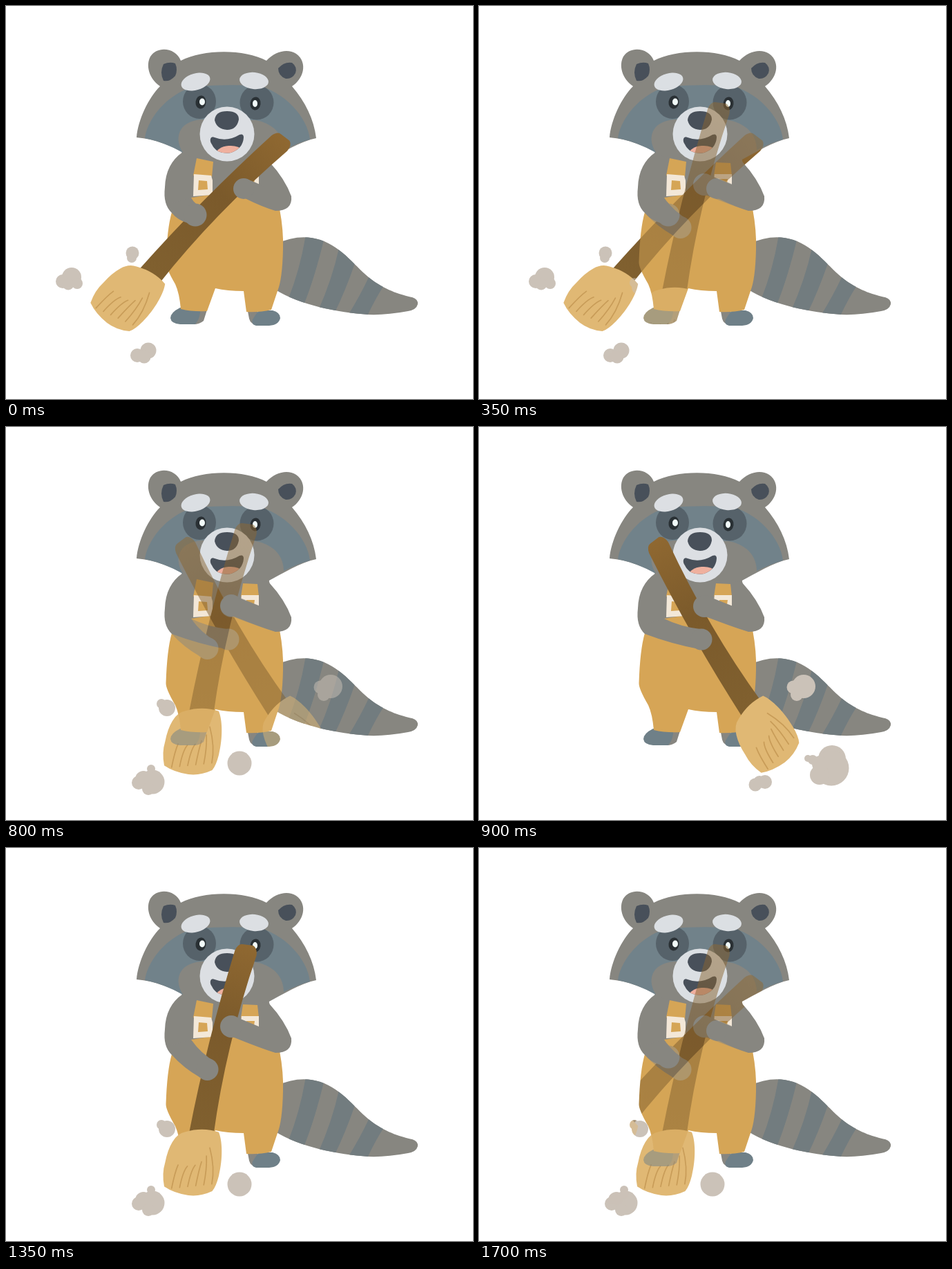
Animation, 676 px wide and 568 px high, one loop 1.8 s. Source, as an HTML page with a canvas:

```html
<!DOCTYPE html>
<html lang="en">
<head>
<meta charset="utf-8">
<title>Sweeping raccoon</title>
<style>
html, body { margin: 0; width: 100%; height: 100%; overflow: hidden; background: #fff; }
canvas { display: block; }
</style>
</head>
<body>
<canvas id="stage" width="676" height="568"></canvas>
<script>
const W = 676, H = 568;
const FUR = '#878680', BLUE = '#71828a', DARK = '#48505a', PALE = '#dcdfe3',
      CLOTH = '#d6a556', CREAM = '#f3e8d8', DUST = '#cbc2b8';

// broom: joint x, y and tilt; hands: x, y, r; dust puffs: x, y, r
const poses = [
  { broom: [211, 387, 44.4], left: [274, 302, 16.5], right: [344, 264, 15],
    dust: [[95, 392, 14], [82, 398, 10], [103, 401, 8], [90, 402, 8.5],
           [183, 357, 9.5], [182, 364, 7], [206, 498, 11.5], [190, 505, 10], [200, 507, 9.5]] },
  { broom: [284, 408, 13.8], left: [291.5, 320, 16], right: [326, 258, 16],
    dust: [[233, 406, 12], [225, 400, 7], [212, 513, 17.5], [192, 514, 10], [199, 509, 12],
           [210, 494, 6], [206, 523, 9], [338, 486, 17.5]] },
  { broom: [392, 403, -30], left: [322, 307, 15.5], right: [326, 259, 16],
    dust: [[470, 375, 17], [455, 376, 9.5], [460, 387, 9],
           [511, 480, 20], [510, 493, 25.5], [493, 503, 14], [494, 487, 12],
           [483, 481, 7], [476, 479, 5], [414, 513, 10], [400, 517, 9.5], [406, 513, 9]] }
];

function newCanvas() {
  const c = document.createElement('canvas');
  c.width = W;
  c.height = H;
  return c;
}

function drawPose({ broom, left, right, dust }) {
  const canvas = newCanvas(), g = canvas.getContext('2d');

  const fill = (color, path) => {
    g.fillStyle = color;
    g.fill(new Path2D(path));
  };
  const oval = (color, x, y, rx, ry = rx, deg = 0) => {
    g.fillStyle = color;
    g.beginPath();
    g.ellipse(x, y, rx, ry, deg * Math.PI / 180, 0, 7);
    g.fill();
  };
  const clipped = (path, draw) => {
    g.save();
    g.clip(new Path2D(path));
    draw();
    g.restore();
  };

  function tail() {
    const shape = 'M390 344Q425 328 455 338C488 349 506 378 530 396C552 412 574 418 588 421' +
      'Q597 424 596 431Q594 439 582 441Q550 447 525 446C480 443 425 432 390 410Z';
    fill(FUR, shape);
    clipped(shape, () => fill('#727c7f',
      'M434 330H462Q448 390 431 432L408 425Q426 380 434 330Z' +
      'M482 350L505 372Q492 410 475 445L452 440Q472 395 482 350Z' +
      'M526 390L547 404Q534 424 522 450L495 447Q513 418 526 390Z'));
  }

  function feet() {
    fill(FUR, 'M274 436H292L286 455Q280 460 272 460Z M349 436H364V461Q354 460 352 452Z');
    fill('#6f8088', 'M252 436Q238 443 238 451Q239 459 252 460H274Q282 450 281 438Z' +
      'M366 440H386Q397 443 397 451Q395 461 381 462H362Q354 460 357 453Q361 446 366 440Z');
  }

  function clothes() {
    fill(FUR, 'M255 208L380 218L396 300L240 302Z');
    fill(CLOTH, 'M268 277L300 272L366 262L396 293Q402 325 401 352Q400 395 393 412L384 439' +
      'Q367 443 348 442L344 412Q320 412 303 408L291 441Q270 442 253 438Q251 415 245 402' +
      'Q231 378 231.500 370Q233 322 240 298Z');
    fill(CLOTH, 'M276 220L300 225L298 247L271 245Z M343 226L364 227L366 245L340 245Z');
    fill(CREAM, 'M272 243L297 245L299 252V273L271 275Z M341 243H366V262L338 264Z');
    fill(CLOTH, 'M279 252L291 253L292 265L278 266Z M348 250H360L358 263H347Z');
  }

  function shoulders() {
    fill(FUR, 'M256 211Q231 228 230 262Q227 287 240 299L268 277V214Z' +
      'M366 262V232L374 222L381 225Q404 250 413 275L390 290Z');
  }

  function head() {
    fill(FUR, 'M189 190C191 165 206 133 223 116C207 105 202 86 209 73C219 57 246 60 253 79' +
      'C286 62 345 62 377 79C390 65 408 61 420 69C438 82 430 106 414 116C433 138 446 164 449 191' +
      'C425 196 402 211 377 224L265 216C242 203 216 192 189 190Z');
    fill(DARK, 'M228 84Q237 80 245 83Q249 92 245 101Q237 110 228 108Q222 96 228 84Z' +
      'M394 90Q403 80 414 82Q422 88 419 97Q414 106 405 105Q394 101 394 90Z');
    fill(BLUE, 'M201 191C206 158 240 122 277 116Q318 113 362 115C402 122 437 161 440 193' +
      'Q422 198 402 208L256 212Q230 197 201 191Z');
    fill(FUR, 'M257 213C243 194 247 167 283 164L362 165C390 171 402 188 402 209L378 223L268 219Z');

    oval('#56626a', 280, 138, 24, 25);
    oval('#56626a', 363, 139.500, 24.500, 25);
    oval('#293034', 282, 139, 7.500, 9.500, 8);
    oval('#293034', 361, 141, 7.500, 9.500, 8);
    oval('#f1fbfa', 284, 138.500, 4, 5);
    oval('#f1fbfa', 360.500, 141, 3.500, 5);
    oval(PALE, 274.500, 109.500, 21.500, 12, -16);
    oval(PALE, 359, 108, 21, 12, 6);

    oval(PALE, 320, 185, 39.500);
    fill(DARK, 'M302 165Q303 152 320 152Q337 152 337 164Q334 179 320 179Q305 178 302 165Z');
    const mouth = 'M296 192Q297 188 302 190Q320 197 338 186Q344 184 344 190' +
      'Q343 206 326 212Q305 215 298 200Q295 196 296 192Z';
    fill(DARK, mouth);
    clipped(mouth, () => oval('#efb09e', 323, 212, 19, 10, -5));
  }

  function sweep() {
    const [x, y, tilt] = broom;
    g.save();
    g.translate(x, y);
    g.rotate(tilt * Math.PI / 180);
    const wood = g.createLinearGradient(0, -276, 0, 0);
    wood.addColorStop(0, '#8f6831');
    wood.addColorStop(.45, '#7b5a2b');
    wood.addColorStop(1, '#80602f');
    fill(wood, 'M-17.500 8Q-24 -125 -16 -264Q-14 -274 -8 -275L8 -277Q15 -275 16 -264' +
      'Q4 -125 17.500 2Z');
    fill('#e0b874', 'M-23 8Q0 -5 24 -3C32 8 39 32 39 58Q39 74 35 82Q20 94 3 96' +
      'Q-18 98 -34 92Q-42 75 -41 58Q-42 40 -38 27Q-34 13 -23 8Z');
    g.strokeStyle = '#c89c58';
    g.lineWidth = 1.700;
    g.lineCap = 'round';
    g.beginPath();
    for (let i = 0; i < 6; i++) {
      const endX = -23 + 11 * i;
      g.moveTo(-22 + 15 * i - 1.450 * i * i, 57 - 1.400 * i * i);
      g.quadraticCurveTo(endX - 1, 68 - 4 * i, endX, 92 - 4 * i);
    }
    g.stroke();
    g.restore();
  }

  function forearms() {
    const [lx, ly, lr] = left, [rx, ry, rr] = right;
    const d = lr * .7;
    // The farther the hand reaches, the flatter the forearm.
    const reach = Math.min(1, Math.max(0, (lx - 292) / 30));
    const bx = lx - d * (1 - reach), by = ly + d + reach * 4;
    const tx = lx + d * (1 - reach), ty = ly - d - reach * 4;
    fill(FUR, `M240 299Q${(bx + 240) / 2 - 3} ${(by + 299) / 2 + 3} ${bx} ${by}L${tx} ${ty}
      Q${(tx + 268) / 2 - 3} ${(ty + 278) / 2 + 4} 268 277L240 285Z`);
    oval(FUR, lx, ly, lr);
    fill(FUR, `M400 263L413 275Q415 296 390 296Q370 290 ${rx + 2} ${ry + rr - 1}
      L${rx + 4} ${ry - rr + 1}Q${rx + 16} ${ry - 10} 378 263Z`);
    oval(FUR, rx, ry, rr);
  }

  tail();
  feet();
  clothes();
  shoulders();
  head();
  sweep();
  forearms();
  dust.forEach(puff => oval(DUST, ...puff));
  return canvas;
}

const cels = poses.map(drawPose);
const order = [0, 1, 2, 1];
const STEP = 450, HOLD = 350;
const ctx = document.getElementById('stage').getContext('2d');

function frame() {
  const t = performance.now() % (STEP * order.length);
  const k = Math.floor(t / STEP);
  ctx.clearRect(0, 0, W, H);
  ctx.drawImage(cels[order[k]], 0, 0);
  if (t % STEP >= HOLD) {
    // The next pose shows through only where the current one is opaque.
    ctx.save();
    ctx.globalAlpha = .5;
    ctx.globalCompositeOperation = 'source-atop';
    ctx.drawImage(cels[order[(k + 1) % order.length]], 0, 0);
    ctx.restore();
  }
  requestAnimationFrame(frame);
}
frame();
</script>
</body>
</html>
```
